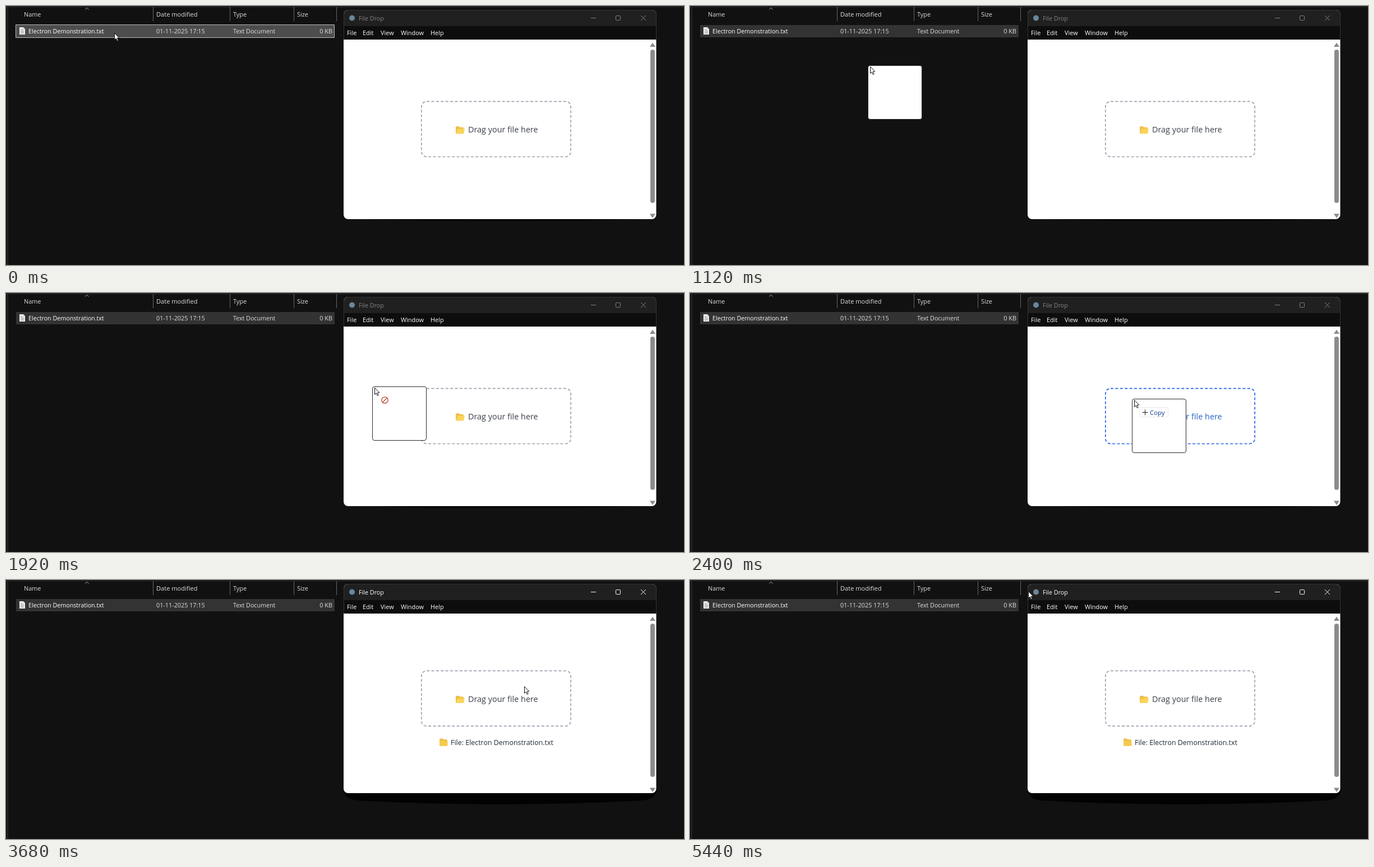
An HTML page with a canvas for the animation above (5.52 s loop, 1209 by 463 pixels).

```html
<!DOCTYPE html>
<html lang="en">
<head>
<meta charset="utf-8">
<title>File Drop</title>
<style>
  html, body { margin: 0; width: 100%; height: 100%; overflow: hidden; background: #111; }
  canvas { display: block; width: 1209px; height: 463px; }
</style>
</head>
<body>
<canvas id="stage" width="1209" height="463"></canvas>
<script>
const ctx = document.getElementById('stage').getContext('2d');
const LOOP = 5520, STEP = 80;
const DRAG_START = 640, DROP = 3600;
const PAGE_SCALE = 0.8375;
const FILE_NAME = 'Electron Demonstration.txt';

// Pointer tip: time, x, y
const PATH = [
  [0, 193, 48], [560, 193, 48], [1120, 321, 108], [1920, 657, 169], [2400, 792, 191],
  [3200, 878, 189], [3600, 924, 190], [4640, 924, 190], [5440, 603, 20], [5520, 603, 20]
];

function slope(i, axis) {
  if (i === 0 || i === PATH.length - 1) return 0;
  const rate = k => (PATH[k + 1][axis] - PATH[k][axis]) / (PATH[k + 1][0] - PATH[k][0]);
  const before = rate(i - 1), after = rate(i);
  return before * after <= 0 ? 0 : 2 * before * after / (before + after);
}

function along(t, axis) {
  let i = 0;
  while (i < PATH.length - 2 && t >= PATH[i + 1][0]) i++;
  const a = PATH[i], b = PATH[i + 1], span = b[0] - a[0];
  const u = (t - a[0]) / span, u2 = u * u, u3 = u2 * u;
  return Math.round((2 * u3 - 3 * u2 + 1) * a[axis] + (3 * u2 - 2 * u3) * b[axis]
    + span * ((u3 - 2 * u2 + u) * slope(i, axis) + (u3 - u2) * slope(i + 1, axis)));
}

function rect(x, y, w, h, color) {
  ctx.fillStyle = color;
  ctx.fillRect(x, y, w, h);
}

function box(x, y, w, h, r, fill, stroke, width = 1) {
  ctx.beginPath();
  ctx.roundRect(x, y, w, h, r);
  if (fill) { ctx.fillStyle = fill; ctx.fill(); }
  if (stroke) { ctx.strokeStyle = stroke; ctx.lineWidth = width; ctx.stroke(); }
}

function trace(points) {
  ctx.beginPath();
  for (let i = 0; i < points.length; i += 2) ctx.lineTo(points[i], points[i + 1]);
}

function line(color, width, ...points) {
  trace(points);
  ctx.strokeStyle = color;
  ctx.lineWidth = width;
  ctx.stroke();
}

function shape(color, ...points) {
  trace(points);
  ctx.closePath();
  ctx.fillStyle = color;
  ctx.fill();
}

function text(str, x, y, size, color, align = 'left') {
  ctx.font = `${size}px "Open Sans", "Noto Sans", sans-serif`;
  ctx.textAlign = align;
  ctx.fillStyle = color;
  ctx.fillText(str, x, y);
}

function documentIcon(x, y) {
  shape('#efefef', x, y, x + 7, y, x + 10, y + 3, x + 10, y + 13, x, y + 13);
  shape('#b5b5b5', x + 7, y, x + 10, y + 3, x + 7, y + 3);
  for (let i = 0; i < 4; i++) rect(x + 2, y + 3.5 + i * 2.2, i ? 6 : 4, 1, '#9a9a9a');
}

function folderIcon(x, y, open) {
  box(x, y, 7, 5, 1.5, '#edba42');
  box(x, y + 1.5, 14, 11.5, 1.5, '#f0c148');
  if (open) shape('#f9d55b', x + 3, y + 5, x + 16, y + 4, x + 14, y + 13, x + 0.5, y + 13);
  else box(x, y + 4, 14.5, 9, 1.5, '#f6c94f');
}

function explorer(selected) {
  rect(0, 0, 1209, 463, '#111');
  rect(0, 1, 1209, 1, '#303030');
  rect(2, 2, 2, 461, '#272727');
  for (const x of [262, 399, 513, 589]) rect(x, 2, 1, 25, '#666');
  line('#aaa', 1, 141, 6.5, 144.3, 3.3, 147.6, 6.5);
  const head = '#dedede';
  text('Name', 32, 19, 10.8, head);
  text('Date modified', 268, 19, 11.1, head);
  text('Type', 405, 19, 10.9, head);
  text('Size', 519, 19, 10.9, head);

  if (selected) box(17.5, 33.5, 568, 23, 0, '#4d4d4d', '#bcbcbc');
  else rect(18, 34, 568, 22, '#333');
  documentIcon(24, 38);
  text(FILE_NAME, 40, 49, 10.7, '#fff');
  text('01-11-2025 17:15', 268, 49, 10.8, head);
  text('Text Document', 405, 49, 10.7, head);
  text('0 KB', 582, 49, 10.9, head, 'right');
}

function shadow(active) {
  ctx.fillStyle = '#020203';
  ctx.beginPath();
  if (active) {
    ctx.moveTo(603, 376);
    ctx.quadraticCurveTo(604, 391, 625, 394);
    ctx.quadraticCurveTo(880, 408, 1137, 394);
    ctx.quadraticCurveTo(1158, 391, 1160, 376);
  } else {
    ctx.moveTo(645, 381);
    ctx.quadraticCurveTo(880, 388, 1136, 381);
  }
  ctx.fill();
}

// A 320 x 120 box with a 2 px dashed border, shown at page scale
function dropZone(y, hot) {
  ctx.save();
  ctx.translate(740, y);
  ctx.scale(PAGE_SCALE, PAGE_SCALE);
  ctx.setLineDash([6, 4.037]);
  box(1, 1, 318, 118, 11, null, hot ? '#2563eb' : '#9ca3af', 2);
  ctx.restore();
  folderIcon(802, y + 45.5, true);
  text('Drag your file here', 824, y + 56, 14.4, hot ? '#2564cb' : '#3a3f4b');
}

function appWindow(active, hot) {
  shadow(active);
  ctx.save();
  ctx.beginPath();
  ctx.roundRect(602, 7, 557.5, 374, 8);
  ctx.clip();
  rect(602, 7, 558, 374, '#fff');
  rect(602, 7, 558, 29, '#202020');
  rect(602, 36, 558, 24, '#0d0d0d');
  ctx.restore();
  line('#343434', 1, 602.5, 60, 602.5, 15, 604.5, 10, 609, 7.5,
    1152, 7.5, 1157.5, 10, 1159.5, 15, 1159.5, 60);

  ctx.beginPath();
  ctx.arc(617, 21.5, 5, 0, 7);
  ctx.fillStyle = '#69869c';
  ctx.fill();
  const tone = active ? '#fff' : '#828282';
  text('File Drop', 629, 26, 10.75, tone);
  line(tone, 1, 1043, 21.5, 1052, 21.5);
  box(1087.5, 17.5, 8, 8, 1, null, tone);
  line(tone, 1, 1132, 17, 1141, 26);
  line(tone, 1, 1141, 17, 1132, 26);

  [['File', 608], ['Edit', 636], ['View', 668], ['Window', 704], ['Help', 757]]
    .forEach(([label, x]) => text(label, x, 52, 10.9, '#fff'));

  box(1149, 78, 8, 274, 4, '#8b8b8e');
  shape('#8b8b8e', 1148, 73, 1153, 65.5, 1158, 73);
  shape('#8b8b8e', 1148, 371.5, 1158, 371.5, 1153, 379);

  dropZone(active ? 161.5 : 169.8, hot);
  if (active) {
    folderIcon(773, 283.5, false);
    text('File: ' + FILE_NAME, 793, 294.5, 12.45, '#1f2937');
  }
}

function dragImage(x, y, overWindow, hot) {
  box(x + 0.5, y + 0.5, 96, 96, 3.5, '#fff', '#2a2a2a');
  if (hot) {
    box(x + 13.5, y + 15.5, 51, 17, 2, '#fff', '#e8e8e8');
    line('#222', 1, x + 18.5, y + 24.5, x + 28.5, y + 24.5);
    line('#222', 1, x + 23.5, y + 19.5, x + 23.5, y + 29.5);
    text('Copy', x + 32, y + 28.5, 11.4, '#123d9b');
  } else if (overWindow) {
    const cx = x + 22.5, cy = y + 24.5;
    ctx.beginPath();
    ctx.arc(cx, cy, 5.7, 0, 7);
    ctx.strokeStyle = '#b8442c';
    ctx.lineWidth = 1.3;
    ctx.stroke();
    line('#b8442c', 1.3, cx - 4, cy + 4, cx + 4, cy - 4);
  }
}

function pointer(x, y) {
  ctx.save();
  ctx.translate(x + 0.5, y + 0.5);
  shape('#fff', 0, 0, 0, 12, 2.7, 9.5, 4.8, 14, 6.7, 13.2, 4.7, 8.8, 8.3, 8.6);
  ctx.strokeStyle = '#111';
  ctx.lineWidth = 1;
  ctx.stroke();
  ctx.restore();
}

function draw(t) {
  const x = along(t, 1), y = along(t, 2);
  const dragging = t > DRAG_START && t < DROP;
  const dropped = t >= DROP;
  const hot = dragging && x > 740;
  explorer(t < DRAG_START);
  appWindow(dropped, hot);
  if (dragging) dragImage(x - 4, y - 2, x > 602, hot);
  pointer(x, y);
}

const start = performance.now();
function tick() {
  const t = (performance.now() - start) % LOOP;
  draw(Math.floor(t / STEP) * STEP);
  requestAnimationFrame(tick);
}
tick();
</script>
</body>
</html>
```
